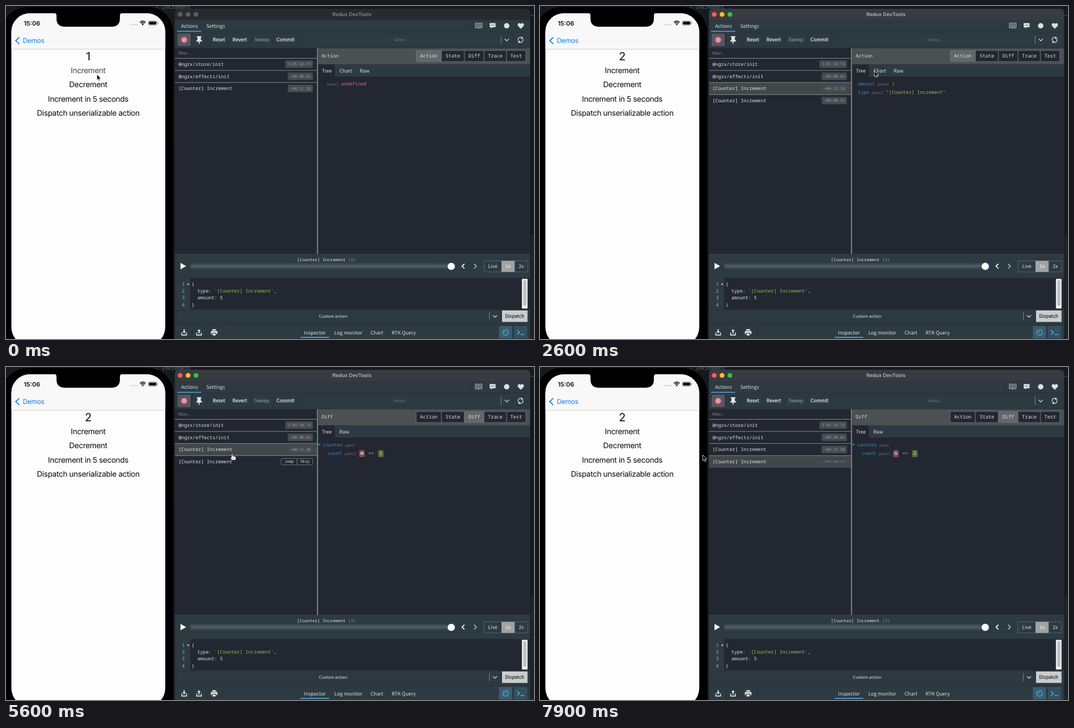
An HTML page for the animation above (8000 ms loop, 941x595 px).

```html
<!DOCTYPE html>
<html lang="en">
<head>
<meta charset="utf-8">
<title>Redux DevTools</title>
<style>
html, body { margin: 0; width: 100%; height: 100%; overflow: hidden; background: #12181d; }
svg { display: block; width: 941px; height: 595px; text-rendering: geometricPrecision; }
text { white-space: pre; }
.ui { font-family: "Noto Sans CJK JP", "Noto Sans CJK SC", "Noto Sans", sans-serif; }
.semi { stroke-width: .28px; }
.mono { font-family: "Noto Sans Mono", monospace; }
.ios { font-family: Inter, sans-serif; }
</style>
</head>
<body>
<svg id="stage" viewBox="0 0 941 595" xmlns="http://www.w3.org/2000/svg"></svg>
<script>
const BAR = '#2e3a42', PANEL = '#232731', LINE = '#253038', TEXT = '#dde2e4', DIM = '#7f898f', BLUE = '#3e8cb5';

const rect = (x, y, w, h, fill, extra = '') =>
  `<rect x="${x}" y="${y}" width="${w}" height="${h}" fill="${fill}" ${extra}/>`;
const path = (d, stroke, width = 1, extra = '') =>
  `<path d="${d}" fill="none" stroke="${stroke}" stroke-width="${width}" ${extra}/>`;
const shape = (d, fill, extra = '') => `<path d="${d}" fill="${fill}" ${extra}/>`;
const dot = (x, y, r, fill, extra = '') => `<circle cx="${x}" cy="${y}" r="${r}" fill="${fill}" ${extra}/>`;
const group = (id, body, extra = '') => `<g id="${id}" ${extra}>${body}</g>`;
const text = (cls, x, y, s, size, fill, extra = '') =>
  `<text class="${cls}" x="${x}" y="${y}" font-size="${size}" fill="${fill}" ${extra}>${s}</text>`;
const mid = 'text-anchor="middle"';
const ui = (x, y, s, fill = TEXT, size = 8.75) => text('ui', x, y, s, size, fill, mid);
const semi = (x, y, s, fill = TEXT, size = 8.5) => text('ui semi', x, y, s, size, fill, `${mid} stroke="${fill}"`);
const mono = (x, y, s, fill = TEXT, size = 8.42, extra = '') => text('mono', x, y, s, size, fill, extra);
const ios = (x, y, s, size, fill, extra = mid) => text('ios', x, y, s, size, fill, extra);
const vline = (x, y1, y2, color = LINE) => path(`M${x} ${y1}V${y2}`, color);
const hline = (y, x1, x2, color = LINE) => path(`M${x1} ${y}H${x2}`, color);

function phone() {
  const label = (y, s, id = '') => ios(146.5, y, s, 13.7, '#0a0a0a', `${mid} letter-spacing="-.35" id="${id}"`);
  return rect(-8, 1, 307, 640, '#000', 'rx="46" stroke="#1f2224" stroke-width="1"') +
    rect(298.5, 160, 2, 80, '#1c1e20') +
    '<clipPath id="screen"><rect x="9.6" y="13" width="274.2" height="594" rx="33"/></clipPath>' +
    '<g clip-path="url(#screen)">' + rect(9, 13, 276, 600, '#fdfdfd') + rect(9, 13, 276, 64, '#f8f8f9') +
    hline(77.2, 9, 285, '#cfcfd1') + '</g>' +
    shape('M86 12.5H207Q203 13 203 17V22Q203 37 188 37H105Q90 37 90 22V17Q90 13 86 12.5Z', '#000') +
    ios(46.3, 34.6, '15:06', 11, '#111', `${mid} font-weight="600"`) +
    [223, 226.6, 230.2, 233.8].map(x => dot(x, 33.3, 1, '#b5b5b7')).join('') +
    path('M238.6 29.2Q243.7 24.4 248.8 29.2M240.4 31.2Q243.7 28.2 247 31.2', '#111', 1.7) +
    shape('M241.7 32.6Q243.7 31 245.7 32.6L243.7 34.8Z', '#111') +
    rect(253.5, 26.5, 15.6, 8, 'none', 'rx="2.3" stroke="#8d8d8f" stroke-width=".8"') +
    rect(254.7, 27.7, 13.2, 5.6, '#111', 'rx="1.3"') + rect(269.9, 29, 1.1, 3, '#8d8d8f') +
    path('M23.6 55.8L17.4 61.8L23.6 67.8', '#167fe6', 1.8) +
    ios(30, 66.2, 'Demos', 12, '#167fe6', 'letter-spacing="-.3"') +
    ios(146.5, 97.2, '1', 20, '#0a0a0a', `${mid} id="count"`) +
    label(120, 'Increment', 'press') + label(145.3, 'Decrement') +
    label(170.5, 'Increment in 5 seconds') + label(195.7, 'Dispatch unserializable action');
}

function topBars() {
  return shape('M301 26V12Q301 5 308 5H927Q934 5 934 12V26Z', '#383b3f', 'id="titlebar"') +
    ios(616.5, 17.8, 'Redux DevTools', 9, '#b4b7b9', `${mid} font-weight="600" id="title"`) +
    group('lights', [310.5, 324.5, 338.5].map(x => dot(x, 15, 4.3, '#5b5e61')).join('')) +
    rect(301, 25, 633, 570, BAR) +
    ui(327, 38.6, 'Actions') + ui(373.7, 38.6, 'Settings') + hline(46.5, 301, 934) +
    rect(305, 44.4, 43, 1.8, '#4aa0c8') + vline(827.5, 26, 46) +
    path('M842.5 31.2V39.8M836.5 30.5H840.5Q842.5 30.5 842.5 32Q842.5 30.5 844.5 30.5H848.5V39H844.5Q842.5 39 842.5 40Q842.5 39 840.5 39H836.5ZM838 33H841M838 35H841M838 37H841M844 33H847M844 35H847M844 37H847', '#c9ced1', .9) +
    shape('M862 30.5H872.5V38H867L864.6 40.6V38H862Z', '#dce0e2') +
    [864.8, 867.2, 869.6].map(x => dot(x, 34.3, .75, BAR)).join('') +
    dot(892.3, 35.3, 4.8, '#dce0e2') +
    shape('M917.5 40.8L912.8 36Q911 33.2 913 31.2Q915.4 29.4 917.5 32Q919.6 29.4 922 31.2Q924 33.2 922.2 36Z', '#dce0e2') +
    rect(306, 49.5, 23, 22, '#5a565f', 'rx="1.5"') + dot(317.5, 60.5, 5.8, '#b9788a', 'opacity=".5"') + dot(317.5, 60.5, 4.8, '#f38fa2') +
    shape('M339.8 54H348.6V55.6H347.2V60L349.4 62.2V63.4H345V67.4H343.4V63.4H339V62.2L341.2 60V55.6H339.8Z', '#e3e7e9') +
    [331.5, 357.5].map(x => vline(x, 48, 74)).join('') +
    [[363, 33], [398, 37], [437, 38], [478, 41]].map(([x, w]) => rect(x, 49.5, w, 22, BAR, `stroke="${LINE}" stroke-width=".6"`)).join('') +
    semi(379.5, 63.4, 'Reset') + semi(416.7, 63.4, 'Revert') + semi(456, 63.4, 'Sweep', DIM) + semi(498, 63.4, 'Commit') +
    rect(526, 49.5, 377, 22, BAR, `stroke="${LINE}" stroke-width=".6"`) +
    ui(704.3, 63.2, 'Select...', '#6b757b', 7.5) + vline(882.5, 53, 68, '#7b858b') +
    path('M888.8 58.6L892.5 62.4L896.2 58.6', TEXT, 1.3) +
    path('M913.2 62.2A4.1 4.1 0 0 1 919.6 57.2M920.8 58.8A4.1 4.1 0 0 1 914.4 63.8', TEXT, 1.2) +
    shape('M918.2 54.6L922 57.2L918.4 59.2ZM915.8 61.8L912 64L915.8 66.4Z', TEXT) + hline(75, 301, 934);
}

function badge(y, s, wide = 0) {
  return rect(502 - wide, y - 6.6, 45 + wide, 13.2, '#474c51', 'rx="1.5"') +
    mono(543.2, y + 2.4, s, '#949b9f', 6.78, 'text-anchor="end"');
}

function list() {
  const sep = '#858a8d';
  const row = (y, s) => mono(307.4, y + 2.9, s);
  return rect(301, 75.5, 253, 368, PANEL) +
    text('ui', 307, 87, 'filter...', 7.5, '#7f898f') +
    rect(301, 137, 253, 21, '#42474a', 'id="pick3"') +
    group('row4', rect(301, 158.5, 253, 21.5, '#42474a', 'id="pick4"') + hline(158.3, 301, 554, sep) + row(169, '[Counter] Increment') +
      group('stamp', badge(169, '+00:00.55')) +
      group('tools', rect(490.5, 163.4, 56, 11.4, PANEL, 'rx="1.5" stroke="#747a7f" stroke-width=".9"') +
        vline(518.6, 163.4, 174.8, '#747a7f') + mono(504.6, 171.4, 'Jump', TEXT, 6.9, mid) + mono(532.6, 171.4, 'Skip', TEXT, 6.9, mid))) +
    [93.5, 115.1, 136.7].map(y => hline(y, 301, 554, sep)).join('') +
    row(104, '@ngrx/store/init') + badge(103.8, '3:05:50.74', 4) +
    row(125.6, '@ngrx/effects/init') + badge(125.6, '+00:00.02') +
    row(147.4, '[Counter] Increment') + badge(147.3, '+00:31.20') +
    rect(554, 75.5, 2.5, 368, '#73787c');
}

const tabs = [['Action', 731, 45], ['State', 776, 41], ['Diff', 817, 35], ['Trace', 852, 40], ['Test', 892, 34.5]];

function inspector() {
  const pin = (x, y) => mono(x, y, '(pin)', '#7e888e', 6, 'font-style="italic"');
  const changed = (x, id, bg) => rect(x, 148.5, 10, 12.4, bg, 'rx="2"') + mono(x + 5, 157.3, '0', TEXT, 8.42, `${mid} id="${id}"`);
  return rect(556.5, 75.5, 377.5, 368, PANEL) + rect(556.5, 75.5, 377.5, 28.5, '#4b5052') +
    mono(562.5, 92, 'Action', TEXT, 8.42, 'id="heading"') +
    tabs.map(([s, x, w], i) => rect(x, 79.3, w, 20, PANEL, `id="tab${i}" stroke="#6d7376" stroke-width=".9"`) +
      mono(x + w / 2, 92.2, s, TEXT, 8.6, mid)).join('') +
    rect(556.5, 104, 377.5, 22, BAR) + rect(557, 104.5, 29, 21.5, PANEL) + ui(571.8, 118.8, 'Tree') +
    group('views3', ui(605.5, 118.8, 'Chart') + ui(639, 118.8, 'Raw')) + group('views2', ui(602.7, 118.8, 'Raw')) +
    group('blank', pin(570.5, 141.6) + mono(588.5, 141.8, ':') + mono(597, 141.8, 'undefined', '#d5737a')) +
    group('action', mono(566.6, 141.8, 'amount', BLUE) + pin(600.3, 141.6) + mono(617.6, 141.8, ':') + mono(627.2, 141.8, '1', '#cf7a3c') +
      mono(566.6, 157.4, 'type', BLUE) + pin(590, 157.2) + mono(608.2, 157.4, ':') + mono(616.8, 157.4, '"[Counter] Increment"', '#a3b556')) +
    group('state', shape('M557.5 136.8L561 139L557.5 141.2Z', BLUE) + mono(565, 141.8, 'counter', BLUE) + pin(603.8, 141.6) +
      mono(622, 141.8, ':') + mono(630, 141.8, '{ count: 1 }', DIM)) +
    group('diff', shape('M556.4 137.2H560.8L558.6 141Z', BLUE) + mono(565, 141.8, 'counter', BLUE) + pin(603.8, 141.6) +
      mono(573.6, 157.4, 'count', BLUE) + pin(602.6, 157.2) + mono(620.2, 157.4, ':') + changed(629.3, 'before', '#7d4b53') +
      path('M631 154.6H637.6', TEXT, .9) + mono(646, 157.4, '=&gt;', '#a9b0b4') + changed(663, 'after', '#596a33'));
}

function player() {
  return rect(301, 443.5, 633, 42, BAR) + hline(443.8, 301, 934, '#3a464e') +
    text('mono', 518.6, 455.6, '[Counter] Increment <tspan id="step" fill="#8a949a">(2)</tspan>', 7.6, TEXT) +
    shape('M311 459L321 464.8L311 470.6Z', '#fff') +
    rect(328, 459.3, 473, 10.8, '#3c4750', 'rx="2"') + rect(330, 462.2, 469, 4.8, '#4d5860', 'rx="1.5"') +
    dot(793.5, 465.2, 6.4, '#fff') +
    path('M817 460.6L812.8 464.8L817 469', '#fff', 1.7) + path('M834.2 460.6L838.4 464.8L834.2 469', '#b9c0c4', 1.5) +
    rect(852, 455.3, 78, 19.8, BAR, 'stroke="#5c6870" stroke-width=".9"') + rect(883, 455.3, 23.5, 19.8, '#a0a3a2') +
    vline(906.8, 455.3, 475.1, '#5c6870') +
    ui(867.5, 468.2, 'Live') + ui(894.8, 468.2, '1x', '#fff') + ui(918.3, 468.2, '2x');
}

function editor() {
  const ys = [499.8, 512, 524.4, 536.6];
  return rect(301, 486, 633, 56, PANEL) + rect(301, 486, 27, 56, BAR) +
    ys.map((y, i) => mono(318.6, y, i + 1, '#a4adb2', 8.42, 'text-anchor="end"')).join('') +
    shape('M322.8 496H327L324.9 499.2Z', '#c4cacd') +
    mono(330.8, ys[0], '{') + mono(341, ys[1], 'type: <tspan fill="#a3b556">\'[Counter] Increment\'</tspan>,') +
    mono(341, ys[2], 'amount: 5') + mono(330.8, ys[3], '}') +
    rect(335.8, 528.4, 1, 10.4, '#dfe4e6', 'id="caret"') +
    rect(919.5, 487.5, 10, 53, '#f8f8f8') + rect(921.8, 489.5, 5.8, 46.5, '#c0c1c1', 'rx="2.9"');
}

function bottomBars() {
  return rect(301, 542, 633, 53, BAR) + rect(305, 543.8, 577, 20.8, BAR, `stroke="${LINE}" stroke-width=".8"`) +
    ui(583, 557, 'Custom action', TEXT, 7.5) + vline(861.5, 547, 561, '#7b858b') +
    path('M867.8 552.6L871.5 556.2L875.2 552.6', TEXT, 1.3) +
    rect(884, 544, 45.5, 20.5, '#cacdcd') + semi(906.5, 557.3, 'Dispatch', '#2b3238', 8.4) +
    hline(569, 301, 934) +
    [331.5, 357.5, 386.5].map(x => vline(x, 570, 595)).join('') +
    [317.5, 344].map((x, i) => shape(`M${x - 5} 583.6H${x - 3.4}V587H${x + 3.4}V583.6H${x + 5}V588.8H${x - 5}Z`, TEXT) +
      shape(i ? `M${x} 577.4L${x + 3.2} 581H${x + 1}V585H${x - 1}V581H${x - 3.2}Z` : `M${x} 585L${x - 3.2} 581.4H${x - 1}V577.6H${x + 1}V581.4H${x + 3.2}Z`, TEXT)).join('') +
    shape('M367.6 577.6H374.4V580H367.6ZM365.2 580.8H376.8V586.2H374.8V584H367.2V586.2H365.2ZM368.4 585H373.6V588.8H368.4Z', TEXT) +
    ui(550.6, 586.6, 'Inspector') + rect(525, 591.2, 51, 1.8, '#4aa0c8') +
    ui(610, 586.6, 'Log monitor') + ui(661, 586.6, 'Chart') + ui(708.7, 586.6, 'RTK Query') +
    rect(878.5, 572, 23.5, 22, '#3b5c70', 'rx="1.5"') + rect(905, 572, 24, 22, '#33505f', 'rx="1.5"') +
    path('M887.4 579.2A5 5 0 1 0 890.4 578.2V580.2M890.4 583.2L887.6 580.4', '#58b0de', 1.2) +
    path('M910.8 579.4L915.2 583.2L910.8 587', '#58b0de', 1.5) + path('M917 587H923.6', '#58b0de', 1.4);
}

const backdrop = rect(0, 0, 941, 595, '#141b20') + rect(934, 410, 7, 185, '#1c252b') +
  rect(934, 16.5, 7, 1.2, '#2c5063') + mono(266, 5, "] Increment',", '#5f7078', 9.7);

const cursor = group('cursor',
  shape('M0 0V10.4L2.4 8.2L4 11.8L5.8 11L4.2 7.6H7.4Z', '#000', 'id="arrow" stroke="#fff" stroke-width=".8"') +
  shape('M-1.2 1Q-1.1 0 0 0Q1.1 0 1.2 1V4.2Q3 3.6 3.3 4.6Q5 4.2 5.2 5.3Q6.8 5.2 6.8 6.4V8.4Q6.6 10 5.6 11.6H0Q-1.4 9.6-3.4 7.6Q-3.6 6-1.2 7.2Z', '#fff', 'id="hand" stroke="#222" stroke-width=".8"') +
  path('M1.6 7.4V9.8M3.2 7.4V9.8', '#555', .6, 'id="knuckles"'));

const stage = document.getElementById('stage');
stage.innerHTML = backdrop + phone() + topBars() + list() + inspector() + player() + editor() + bottomBars() + cursor;

const el = {};
stage.querySelectorAll('[id]').forEach(n => { if (n.id) el[n.id] = n; });
const show = (id, on) => el[id].setAttribute('visibility', on ? 'visible' : 'hidden');
const label = (id, s) => { if (el[id].textContent !== s) el[id].textContent = s; };

// time, x, y of the pointer tip
const route = [
  [0, 162, 122], [400, 163, 122], [1000, 342, 149], [1700, 358, 148], [2000, 359, 148], [2700, 610, 114],
  [3200, 813, 88], [3600, 806, 90], [3900, 808, 90], [4100, 832, 91], [4300, 832, 91], [4600, 772, 102], [5100, 768, 103],
  [5400, 452, 164], [5600, 403, 155], [5900, 392, 159], [6500, 392, 159], [6600, 391, 156],
  [7000, 402, 165], [7400, 390, 163], [7600, 384, 162], [7900, 290, 157], [8000, 290, 157]
];

function pointer(t) {
  const i = Math.max(1, route.findIndex(p => p[0] > t));
  const [a, b] = [route[i - 1], route[i]];
  const k = (t - a[0]) / (b[0] - a[0]), e = k * k * (3 - 2 * k);
  return [a[1] + (b[1] - a[1]) * e, a[2] + (b[2] - a[2]) * e];
}

const ramp = (t, start) => Math.min(1, Math.max(0, (t - start) / 280));
const flipY = (id, s) => {
  show(id, s > 0.02);
  el[id].setAttribute('transform', `translate(0 169) scale(1 ${Math.max(s, 0)}) translate(0 -169)`);
};

function draw(t) {
  const twice = t >= 400, focus = t >= 1000, picked = t >= 1300, second = t >= 6600;
  const tab = t < 3400 ? 0 : t < 4200 ? 1 : 2;

  label('count', twice ? '2' : '1');
  label('step', twice ? '(3)' : '(2)');
  el.press.setAttribute('opacity', t < 100 ? .76 : t >= 300 && t < 500 ? .4 : t < 600 && t >= 500 ? .76 : 1);
  el.titlebar.setAttribute('fill', focus ? '#383b3f' : '#282b2e');
  el.title.setAttribute('fill', focus ? '#b4b7b9' : '#85888a');
  [...el.lights.children].forEach((c, i) => c.setAttribute('fill', focus ? ['#fc5b57', '#fdbc2e', '#28c840'][i] : '#5b5e61'));
  show('caret', focus && t < 4500 && t % 1000 < 500);

  el.row4.setAttribute('display', twice ? 'inline' : 'none');
  show('pick3', picked && !second);
  show('pick4', t >= 6000);
  const turn = ramp(t, 5250) - ramp(t, 5980) + ramp(t, 6850) - ramp(t, 7720);
  const c = Math.cos(Math.PI * turn);
  flipY('stamp', c);
  flipY('tools', -c);

  label('heading', tabs[tab][0]);
  tabs.forEach((_, i) => {
    const hover = i === 1 && t >= 3100 && t < 4000 || i === 2 && t >= 4000 && t < 4500;
    el['tab' + i].setAttribute('fill', hover ? '#737879' : i === tab ? '#626869' : PANEL);
  });
  show('views3', tab < 2);
  show('views2', tab === 2);
  show('blank', !picked);
  show('action', picked && tab === 0);
  show('state', tab === 1);
  show('diff', tab === 2);
  label('before', second ? '1' : '0');
  label('after', second ? '2' : '1');

  const [x, y] = pointer(t);
  const hand = t >= 1100 && t < 2300 || t >= 3100 && t < 4500 || t >= 5300 && t < 7900;
  el.cursor.setAttribute('transform', `translate(${x.toFixed(2)} ${y.toFixed(2)})`);
  show('arrow', !hand);
  show('hand', hand);
  show('knuckles', hand);
}

const begin = performance.now();
function tick() {
  draw(Math.floor((performance.now() - begin) % 8000 / 100) * 100);
  requestAnimationFrame(tick);
}
draw(0);
requestAnimationFrame(tick);
</script>
</body>
</html>
```
